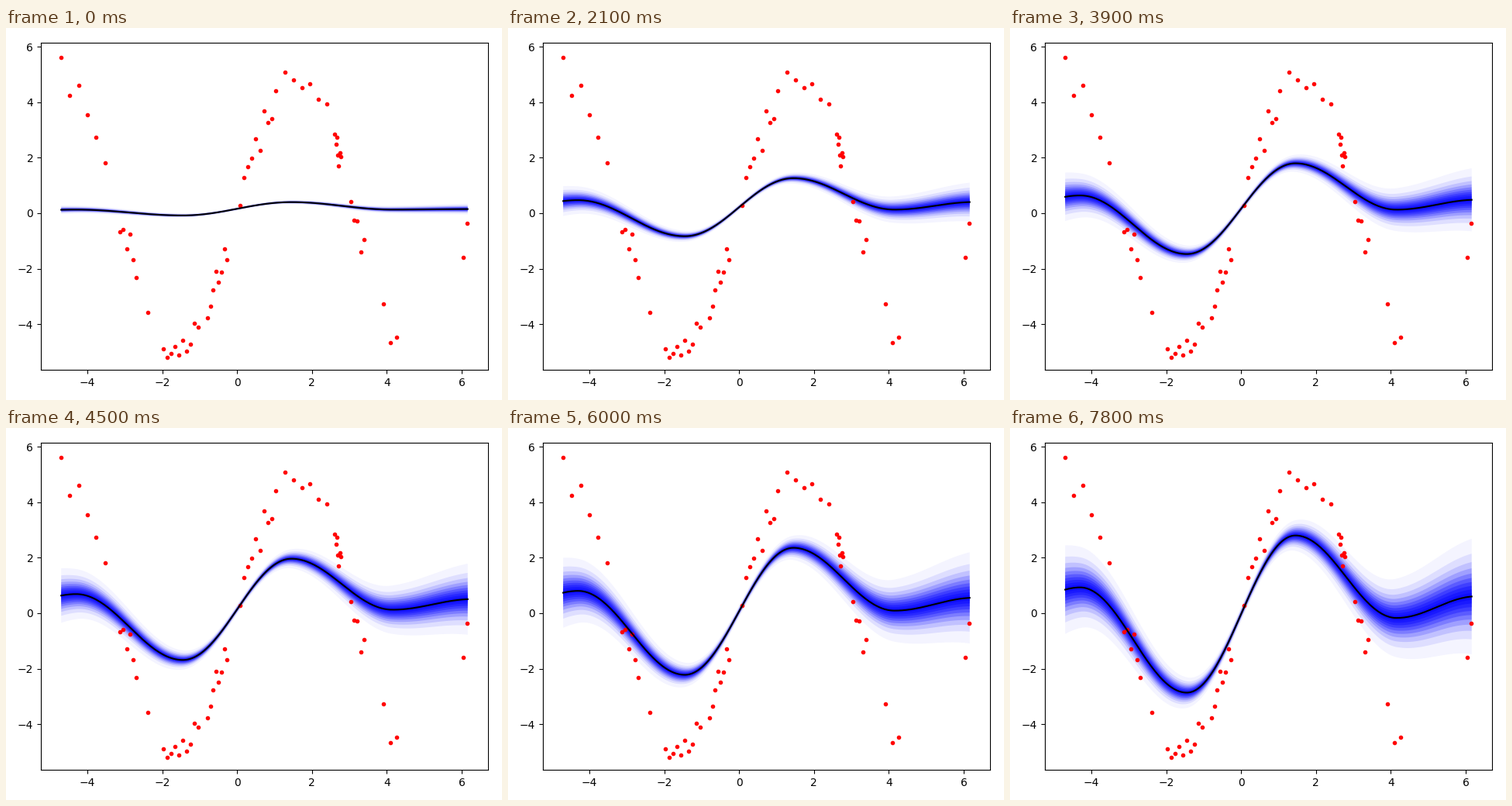
A matplotlib script for the animation above (8 s loop, 640 by 480 pixels).

```python
import numpy as np
import matplotlib.pyplot as plt
from matplotlib.animation import FuncAnimation

W, H, DPI = 640, 480, 100
LEFT, RIGHT, TOP, BOTTOM = 45, 622, 19, 441     # axes box in pixels
X0, Y0, SX, SY = 298.2, 239, 48.3, 35.83        # origin and pixels per unit
TICK_MS, TICKS, TICKS_PER_STEP, LAST_STEP = 100, 80, 3, 26
LAYERS = 10

# Clusters of observations: first x, last x, count
CLUSTERS = [(-4.70, -3.53, 6), (-3.13, -2.69, 6), (-2.38, -2.38, 1),
            (-1.97, -1.04, 10), (-0.79, -0.27, 8), (0.08, 1.03, 10),
            (1.28, 2.40, 6), (2.61, 2.77, 7), (3.04, 3.39, 5),
            (3.91, 4.26, 3), (6.04, 6.15, 2)]

# Turning points of the mean: x, first value, last value, growth power
TURNS = [(-7.1, 0.00, -0.70, 1), (-4.3, 0.13, 0.93, 0.65),
         (-1.45, -0.08, -2.86, 1), (1.45, 0.40, 2.80, 0.78),
         (4.15, 0.13, -0.17, 8), (6.3, 0.15, 0.61, 0.45)]

x = np.linspace(-4.7, 6.16, 200)


def mean_curve(u):
    """Half-cosine arcs between the turning points at progress u."""
    knots, start, end, power = np.transpose(TURNS)
    values = start + (end - start) * u ** power
    i = np.searchsorted(knots, x) - 1
    t = (x - knots[i]) / (knots[i + 1] - knots[i])
    return values[i] + (values[i + 1] - values[i]) * (1 - np.cos(np.pi * t)) / 2


def half_width(u):
    """Outer half-width of the band: pinched at zero, widening outwards."""
    return np.hypot(0.06 + 0.2 * u, (0.03 + 0.305 * u) * x)


def normal_quantile(p):
    return (p ** 0.135 - (1 - p) ** 0.135) / 0.1975


def observations():
    px = np.concatenate([np.linspace(*cluster) for cluster in CLUSTERS])
    noise = np.random.default_rng(3).normal(0, 0.4, px.size)
    return px, 5 * np.sin(px) + np.clip(noise, -0.6, 0.6)


z = normal_quantile(np.linspace(0.025, 0.5, LAYERS, endpoint=False))
scales = z / z[0]

fig = plt.figure(figsize=(W / DPI, H / DPI), dpi=DPI)
ax = fig.add_axes([LEFT / W, 1 - BOTTOM / H, (RIGHT - LEFT) / W, (BOTTOM - TOP) / H])
ax.set_xlim((LEFT - X0) / SX, (RIGHT - X0) / SX)
ax.set_ylim((Y0 - BOTTOM) / SY, (Y0 - TOP) / SY)
ax.set_autoscale_on(False)

bands = [ax.fill(x, x, color="b", alpha=0.043 * (k + 1), lw=0, zorder=1)[0]
         for k in range(LAYERS)]
ax.plot(*observations(), "r.")
line, = ax.plot(x, x, "k")


def draw(tick):
    u = tick // TICKS_PER_STEP / LAST_STEP
    mean, width = mean_curve(u), half_width(u)
    for band, scale in zip(bands, scales):
        upper, lower = mean + scale * width, mean - scale * width
        band.set_xy(np.column_stack([np.r_[x, x[::-1]], np.r_[upper, lower[::-1]]]))
    line.set_ydata(mean)
    return [*bands, line]


anim = FuncAnimation(fig, draw, frames=TICKS, interval=TICK_MS,
                     init_func=lambda: draw(0), repeat=True, repeat_delay=0)
plt.show()
```
